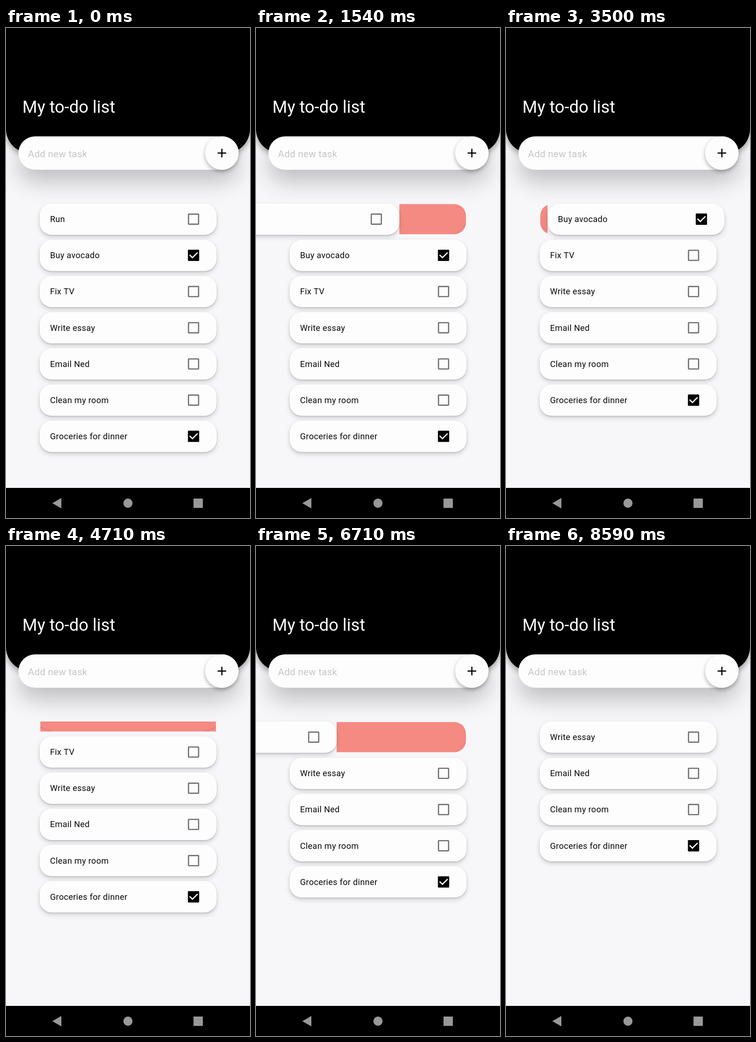
Animation of 529 by 1058 pixels, one loop 8.64 s. Source, as an HTML page with a canvas:

```html
<!DOCTYPE html>
<html lang="en">
<head>
<meta charset="utf-8">
<title>My to-do list</title>
<style>
  html, body { margin: 0; width: 100%; height: 100%; overflow: hidden; background: #f7f7fa; }
  canvas { display: block; width: 529px; height: 1058px; }
</style>
</head>
<body>
<canvas id="stage" width="529" height="1058"></canvas>
<script>
const ctx = document.getElementById('stage').getContext('2d');
const W = 529, H = 1058, LOOP = 8640;
const FONT = 'Roboto, "Noto Sans", sans-serif';
const PAPER = '#fdfdfd', RED = '#f48a82', GREY = '#999';

const card = { x: 73, y: 379, w: 383.5, h: 67.5, r: 26, pitch: 78.15 };
const GAP = card.pitch - card.h;

// Swipes run from start to end; the empty slot then folds away.
const HOLD = 120, FOLD = 180;
const tasks = [
  { text: 'Run', swipe: { start: 1041, end: 2221, dir: -1 } },
  { text: 'Buy avocado', done: true, swipe: { start: 3341, end: 4518, dir: 1 } },
  { text: 'Fix TV', swipe: { start: 5802, end: 7188, dir: -1 } },
  { text: 'Write essay' },
  { text: 'Email Ned' },
  { text: 'Clean my room' },
  { text: 'Groceries for dinner', done: true }
];

const clamp01 = v => Math.max(0, Math.min(1, v));
const glide = p => (1 - Math.cos(Math.PI * clamp01(p))) / 2;

// cubic-bezier(.25, .1, .25, 1)
function ease(p) {
  let lo = 0, hi = 1;
  for (let i = 0; i < 20; i++) {
    const m = (lo + hi) / 2;
    const x = 0.75 * m * (1 - m) + m * m * m;
    if (x < p) lo = m; else hi = m;
  }
  const u = 1 - lo;
  return 0.3 * u * u * lo + 3 * u * lo * lo + lo * lo * lo;
}

function roundPath(x, y, w, h, r) {
  ctx.beginPath();
  ctx.roundRect(x, y, w, h, r);
}

function fill(color, dy, blur, alpha) {
  ctx.save();
  ctx.fillStyle = color;
  if (blur) {
    ctx.shadowColor = `rgba(0,0,0,${alpha})`;
    ctx.shadowBlur = blur;
    ctx.shadowOffsetY = dy;
  }
  ctx.fill();
  ctx.restore();
}

function label(text, x, y, size, color, spacing) {
  ctx.font = `400 ${size}px ${FONT}`;
  ctx.letterSpacing = spacing + 'px';
  ctx.fillStyle = color;
  ctx.fillText(text, x, y);
}

function line(points, color, width) {
  ctx.beginPath();
  points.forEach(([x, y]) => ctx.lineTo(x, y));
  ctx.strokeStyle = color;
  ctx.lineWidth = width;
  ctx.stroke();
}

function drawHeader() {
  roundPath(0, -60, W, 330, [0, 0, 52, 52]);
  fill('#000', 5, 14, 0.4);
  label('My to-do list', 35.5, 182.5, 36.8, '#fff', 0);

  roundPath(27, 234, 477.5, 72, 36);
  fill(PAPER, 24, 50, 0.24);
  label('Add new task', 47.6, 278.5, 21, '#c6c6c6', 0.2);

  ctx.beginPath();
  ctx.arc(468, 270, 36.3, 0, 7);
  fill(PAPER, 4, 9, 0.3);
  line([[458.7, 270], [477.3, 270]], '#000', 2.6);
  line([[468, 260.7], [468, 279.3]], '#000', 2.6);
}

function drawCheckbox(x, cy, done) {
  const y = cy - 12.2, s = 24.4;
  if (done) {
    roundPath(x, y, s, s, 1.4);
    fill('#000');
    const at = (u, v) => [x + u * s, y + v * s];
    line([at(0.15, 0.46), at(0.4, 0.71), at(0.86, 0.25)], '#fff', 2.6);
  } else {
    roundPath(x + 1.3, y + 1.3, s - 2.6, s - 2.6, 0.8);
    ctx.strokeStyle = '#6f6f6f';
    ctx.lineWidth = 2.6;
    ctx.stroke();
  }
}

function drawCard(task, dx, y) {
  const x = card.x + dx, cy = y + card.h / 2;
  roundPath(x, y, card.w, card.h, card.r);
  fill(PAPER, 5, 11, 0.15);
  fill(PAPER, 1.5, 3, 0.17);
  label(task.text, x + 22.5, cy + 6.3, 18.34, '#0a0a0a', 0.33);
  drawCheckbox(x + 321.4, cy, task.done);
}

// Red layer behind a card, limited to one window of the slot.
function drawRed(x, w, y, h) {
  ctx.save();
  ctx.beginPath();
  ctx.rect(x, y, w, h);
  ctx.clip();
  const top = y - (card.h - h) / 2;
  roundPath(card.x + 1.3, top + 1.3, card.w - 2.6, card.h - 2.6, 25);
  fill(RED);
  const left = card.x + 1.5, right = card.x + card.w - 1.5, low = y + h;
  const rise = Math.min(24, h * 0.43), edge = 'rgba(110,60,60,0.25)';
  line([[left, low - rise], [left + 23, low]], edge, 1);
  line([[right, low - rise], [right - 23, low]], edge, 1);
  ctx.restore();
}

// Draws one task and returns the height its slot takes.
function drawTask(task, y, t) {
  const s = task.swipe;
  if (!s || t <= s.start) {
    drawCard(task, 0, y);
    return card.pitch;
  }
  if (t < s.end) {
    const d = card.w * glide((t - s.start) / (s.end - s.start));
    drawRed(s.dir > 0 ? card.x : card.x + card.w - d, d, y, card.h);
    drawCard(task, s.dir * d, y);
    return card.pitch;
  }
  const p = (t - s.end - HOLD) / FOLD;
  if (p >= 1) return 0;
  const h = card.h * (1 - ease(clamp01(p)));
  drawRed(card.x, card.w, y, h);
  return h + GAP;
}

function drawNav() {
  ctx.fillStyle = '#000';
  ctx.fillRect(0, 993, W, H - 993);
  ctx.beginPath();
  ctx.moveTo(100.5, 1026);
  ctx.lineTo(120, 1014.8);
  ctx.lineTo(120, 1037.2);
  fill(GREY);
  ctx.beginPath();
  ctx.arc(264.4, 1026, 9.9, 0, 7);
  fill(GREY);
  roundPath(406.5, 1016, 20.3, 20.3, 1);
  fill(GREY);
}

function draw(t) {
  ctx.fillStyle = '#f7f7fa';
  ctx.fillRect(0, 0, W, H);
  drawHeader();
  let y = card.y;
  for (const task of tasks) y += drawTask(task, y, t);
  drawNav();
}

let origin;
function tick(now) {
  origin ??= now;
  draw((now - origin) % LOOP);
  requestAnimationFrame(tick);
}
draw(0);
requestAnimationFrame(tick);
</script>
</body>
</html>
```
